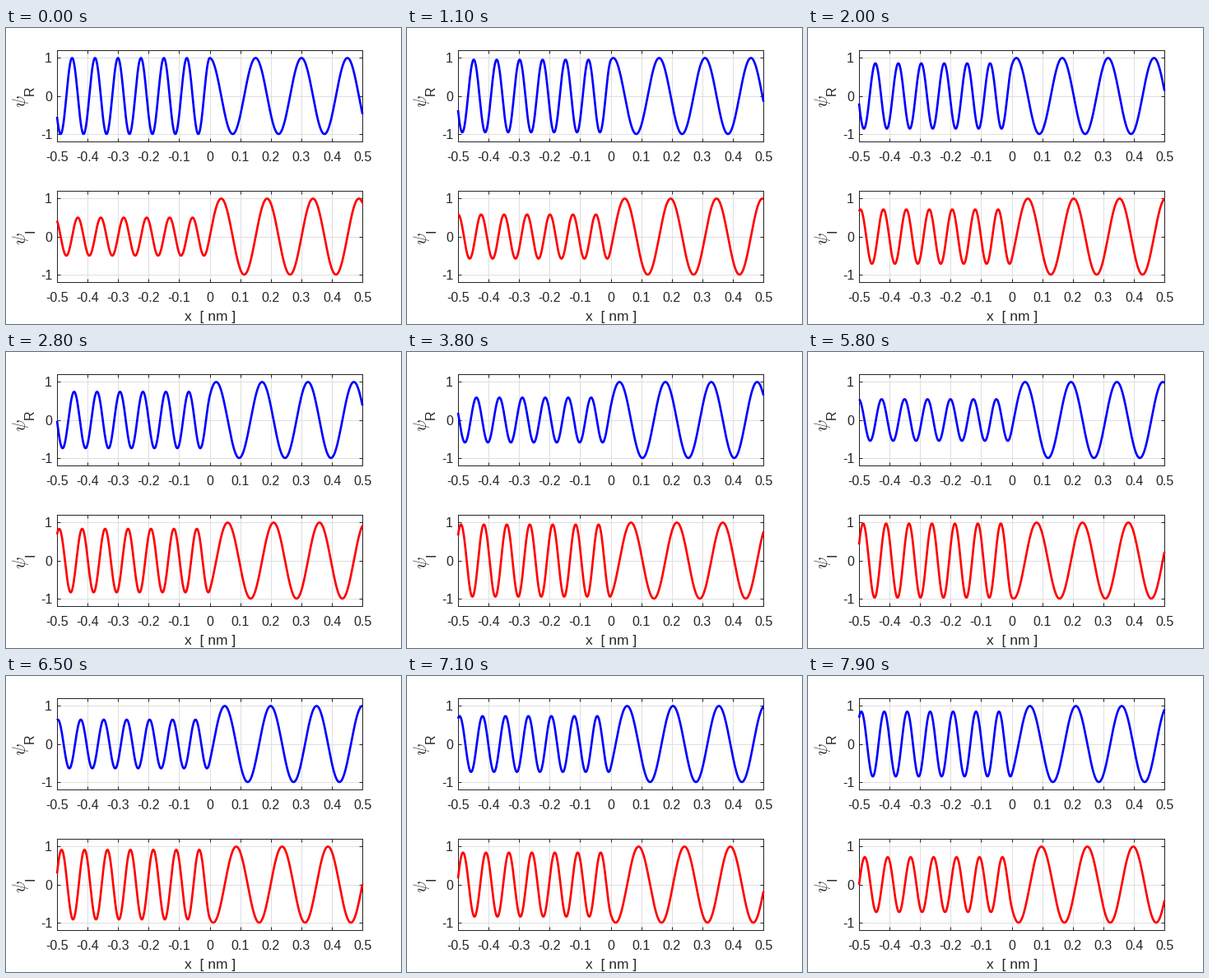
These frames come from a looping animation (480x360 px, 8000 ms). A matplotlib script:

```python
import numpy as np
import matplotlib.pyplot as plt
from matplotlib.animation import FuncAnimation

W, H, DPI = 480, 360, 96
FRAMES, STEP_MS = 80, 100
INK = "#262626"
K_LEFT = 2 * np.pi / 0.0751    # wave number for x < 0
K_RIGHT = K_LEFT / 2           # wave number for x > 0
PHASE_STEP = 2 * np.pi / 199

plt.rcParams.update({
    "font.family": "Liberation Sans",
    "mathtext.fontset": "cm",
    "axes.unicode_minus": False,
    "text.color": INK,
})

fig = plt.figure(figsize=(W / DPI, H / DPI), dpi=DPI, facecolor="white")

x = np.linspace(-0.5, 0.5, 801)
shape = np.where(
    x < 0,
    np.cos(K_LEFT * x) + 0.5j * np.sin(K_LEFT * x),
    np.exp(1j * K_RIGHT * x),
)


def label(px, py, text, pt, **kw):
    """Place text with its baseline at pixel (px, py) from the top left."""
    return fig.text(px / W, 1 - py / H, text, fontsize=pt, va="baseline", **kw)


def panel(top, color):
    left, width, height = 62, 371.2, 111
    ax = fig.add_axes([left / W, 1 - (top + height) / H, width / W, height / H])
    ax.set(xlim=(-0.5, 0.5), ylim=(-1.2, 1.2))
    ticks = [n / 10 for n in range(-5, 6)]
    ax.set_xticks(ticks, [f"{t:g}" for t in ticks])
    ax.set_yticks([-1, 0, 1], ["-1", "0", "1"])
    ax.tick_params(direction="in", top=True, right=True, length=3,
                   width=0.75, color=INK, labelcolor=INK, labelsize=12)
    ax.tick_params(axis="x", pad=8.6)
    ax.tick_params(axis="y", pad=4.5)
    ax.grid(color="#dfdfdf", linewidth=0.75)
    ax.set_axisbelow(True)
    for spine in ax.spines.values():
        spine.set(color=INK, linewidth=0.75)
    line, = ax.plot(x, np.zeros_like(x), color=color, linewidth=2,
                    clip_on=False, zorder=3, solid_capstyle="butt")
    return line


def psi_label(py, sub):
    kw = dict(rotation=90, rotation_mode="anchor", ha="left")
    label(23.5, py, r"$\psi$", 16, **kw)
    label(34, py - 15, sub, 12, **kw)


real = panel(27.2, "#0000ff")
imag = panel(198.2, "#ff0000")
psi_label(97, "R")
psi_label(264, "I")
label(248, 356, "x  [ nm ]", 13, ha="center")


def update(i):
    psi = shape * np.exp(-1j * PHASE_STEP * i)
    real.set_ydata(psi.real)
    imag.set_ydata(psi.imag)
    return real, imag


anim = FuncAnimation(fig, update, frames=FRAMES, interval=STEP_MS,
                     repeat=True, repeat_delay=0, blit=False)
plt.show()
```
